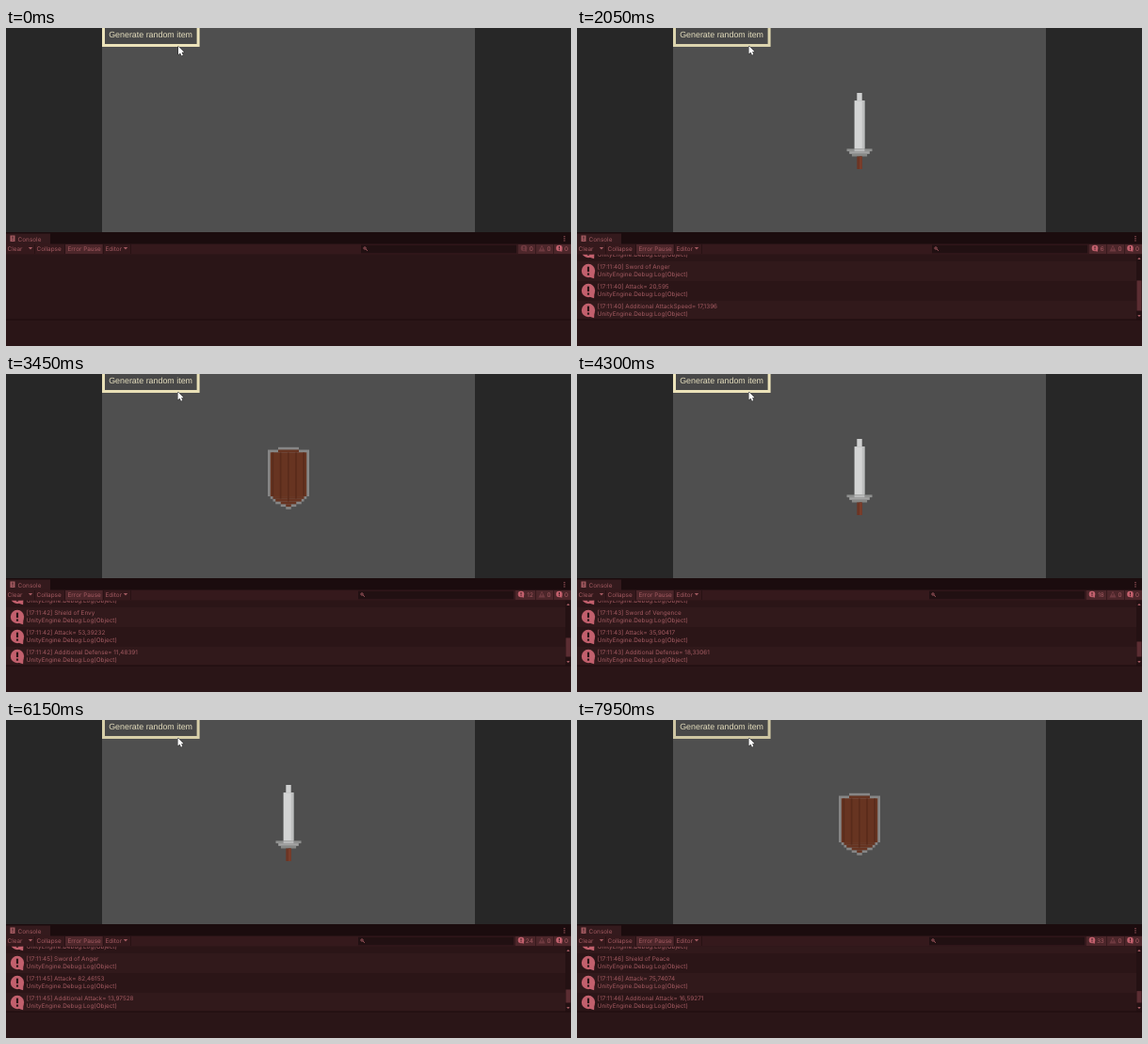
These frames come from a looping animation (600 px wide and 338 px high, 8 s). An HTML page with a canvas:

```html
<!DOCTYPE html>
<html lang="en">
<head>
<meta charset="utf-8">
<title>Random item generator</title>
<style>
  html, body { margin: 0; width: 100%; height: 100%; overflow: hidden; background: #2a1517; }
  canvas { display: block; width: 600px; height: 338px; }
</style>
</head>
<body>
<canvas width="600" height="338"></canvas>
<script>
const g = document.querySelector('canvas').getContext('2d');
g.textRendering = 'geometricPrecision';

const LOOP = 8000, ROW = 21, TOP = 241, BOTTOM = 310;
const UI = '6.4px Inter, sans-serif';
const PINK = '#a35a61', ICON = '#c2606d', DIM = '#6f3a40', PANEL = '#2a1517';

// press time, release time, item name, attack, bonus
const clicks = [
  [50, 250, 'Sword of Vengence', '24,97215', 'Attack= 10,08752'],
  [1150, 1300, 'Sword of Anger', '20,595', 'AttackSpeed= 17,1396'],
  [2000, 2130, 'Sword of Peace', '41,30862', 'Defense= 12,70418'],
  [2720, 2880, 'Shield of Envy', '53,39232', 'Defense= 11,48391'],
  [3440, 3560, 'Sword of Envy', '67,18204', 'Attack= 14,25937'],
  [4070, 4180, 'Sword of Vengence', '35,90417', 'Defense= 18,33061'],
  [4680, 4880, 'Shield of Peace', '53,29805', 'AttackSpeed= 10,61039'],
  [5300, 5500, 'Sword of Anger', '82,46153', 'Attack= 13,97528'],
  [5970, 6120, 'Sword of Peace', '28,71346', 'Defense= 15,06284'],
  [6570, 6720, 'Shield of Envy', '99,45107', 'AttackSpeed= 16,97419'],
  [7170, 7320, 'Shield of Peace', '75,74074', 'Attack= 16,59271'],
  [7800, Infinity]
];

const logs = clicks.filter(c => c[2]).flatMap(([, up, name, attack, bonus]) => {
  const stamp = `[17:11:${39 + Math.floor(up / 1000 + .5)}] `;
  return [name, 'Attack= ' + attack, 'Additional ' + bonus].map(s => stamp + s);
});

const clamp = v => Math.max(0, Math.min(1, v));

function rect(x, y, w, h, color) {
  g.fillStyle = color;
  g.fillRect(x, y, w, h);
}

function text(s, x, y, color = PINK, font = UI, align = 'left') {
  g.font = font;
  g.textAlign = align;
  g.fillStyle = color;
  g.fillText(s, x, y);
}

function poly(color, ...p) {
  g.fillStyle = color;
  g.beginPath();
  for (let i = 0; i < p.length; i += 2) g.lineTo(p[i], p[i + 1]);
  g.closePath();
  g.fill();
}

function bubble(x, y, r, color, mark) {
  g.fillStyle = color;
  g.beginPath();
  g.arc(x, y, r, 0, 7);
  g.fill();
  poly(color, x + r * .1, y + r * .9, x + r * .9, y + r * .3, x + r * .85, y + r * 1.15);
  rect(x - r * .15, y - r * .6, r * .3, r * .75, mark);
  rect(x - r * .15, y + r * .35, r * .3, r * .3, mark);
}

// centred bar on a pixel-art grid of size u
function bar(half, row, rows, y0, u, color) {
  rect(300 - half * u, y0 + row * u, half * 2 * u, rows * u, color);
}

function sword() {
  const b = (half, row, rows, color) => bar(half, row, rows, 69, 2.7, color);
  b(1, 0, 3, '#cfd0d0');
  b(2, 3, 19, '#d3d4d4');
  rect(302.7, 77.1, 2.7, 51.3, '#bfc0c0');
  b(5, 22, 1, '#8f908f');
  b(4, 23, 1, '#a3a4a3');
  b(2, 22, 1, '#b9baba');
  b(3, 24, 1, '#878886');
  b(1, 25, 5, '#6d3524');
  rect(300, 136.5, 2.7, 13.5, '#7b3d2a');
}

function shield() {
  const b = (half, row, rows, color) => bar(half, row, rows, 77.8, 2.75, color);
  const rim = '#868686', wood = '#673421';
  b(4, 0, 1, rim);
  b(8, 1, 18, rim);
  [7, 6, 5, 3, 1].forEach((h, i) => b(h, 19 + i, 1, rim));
  b(4, 1, 1, wood);
  b(7, 2, 17, wood);
  [6, 5, 3, 1].forEach((h, i) => b(h, 19 + i, 1, wood));
  for (let i = -2; i <= 2; i++)
    rect(299 + i * 8.2, 83.5, 1.6, 52 - Math.abs(i) * 3, '#592b1b');
}

function button(t) {
  let shade = 0;
  for (const [down, up] of clicks)
    if (t >= down) shade = clamp((t - down) / 100) * (1 - clamp((t - up) / 100));
  const k = 1 - .13 * shade;
  const tint = `rgb(${236 * k},${227 * k},${186 * k})`;
  rect(102, 0, 103.6, 20, tint);
  rect(105, 0, 97.6, 17, '#484848');
  text('Generate random item', 109.2, 10.3, '#e4ddbd', '8.9px "Liberation Sans", Arial, sans-serif');
}

function cursor(t) {
  g.save();
  g.translate(t < 50 ? 183 : 182.5, t < 50 ? 19.6 : 19);
  const shape = new Path2D('M0 0V8.6L2 6.8L3.4 9.8L4.9 9.1L3.6 6.2H6.2Z');
  g.strokeStyle = '#222';
  g.lineWidth = 1;
  g.stroke(shape);
  g.fillStyle = '#fff';
  g.fill(shape);
  g.restore();
}

function toolbar(n) {
  rect(0, 217, 600, 13, '#1b0c0e');
  rect(0, 218.5, 47, 11.5, '#341a1d');
  rect(4.5, 220.5, 5, 6.5, PINK);
  rect(6.6, 221.5, .9, 2.8, PANEL);
  rect(6.6, 225, .9, .9, PANEL);
  text('Console', 12.6, 226.6);
  for (const y of [221, 223.2, 225.4]) rect(592.4, y, 1.2, 1.2, PINK);

  rect(0, 229.5, 600, 11, '#35191c');
  rect(63, 230, 39.5, 10, '#4c262a');
  for (const x of [30, 62, 103, 132]) rect(x, 230, .7, 10, '#231012');
  text('Clear', 1.5, 236.7);
  text('Collapse', 32.5, 236.7);
  text('Error Pause', 65.5, 236.7);
  text('Editor', 105.5, 236.7);
  for (const x of [26, 127]) poly(PINK, x - 2.2, 233, x + 2.2, 233, x, 235.6);

  const shift = n > 9 ? 3 : 0;
  rect(377 - shift, 230.7, 165, 8.6, '#211012');
  g.strokeStyle = PINK;
  g.lineWidth = .9;
  g.beginPath();
  g.arc(381 - shift, 234, 1.2, 0, 7);
  g.moveTo(382 - shift, 235);
  g.lineTo(384 - shift, 236.8);
  g.stroke();

  rect(544 - shift, 230, 18 + shift, 10, '#4c262a');
  rect(563, 230, 18, 10, '#4c262a');
  rect(582, 230, 18, 10, '#4c262a');
  bubble(550 - shift, 234, 3.3, n ? ICON : DIM, '#3a1c20');
  text(n, 559.8, 236.7, PINK, UI, 'right');
  poly(DIM, 569, 230.8, 572.6, 237.6, 565.4, 237.6);
  rect(568.6, 233, .8, 2.5, '#3a1c20');
  text(0, 578.6, 236.7, PINK, UI, 'right');
  bubble(587.5, 234, 3.3, ICON, '#3a1c20');
  text(0, 597, 236.7, PINK, UI, 'right');
}

function consoleRows(n) {
  rect(0, 240, 600, 98, PANEL);
  g.save();
  g.beginPath();
  g.rect(0, 240.5, 600, BOTTOM - 240.5);
  g.clip();
  const scrolled = n > 3;
  const first = scrolled ? 290 - ROW * (n - 1) : TOP;
  for (let i = Math.max(0, n - 4); i < n; i++) {
    const y = first + i * ROW;
    rect(0, y, scrolled ? 594 : 600, ROW, i ? i % 2 ? '#31191b' : '#2b1517' : '#20283d');
    bubble(12, y + 10, 7.2, ICON, PANEL);
    text(logs[i], 21.8, y + 7.6);
    text('UnityEngine.Debug:Log(Object)', 21.8, y + 15.8);
  }
  if (scrolled) {
    const len = 8 + 44 * 69 / (ROW * n);
    rect(594, 240, 6, 70, '#241113');
    poly(PINK, 595.3, 246, 598.7, 246, 597, 243.8);
    poly(PINK, 595.3, 305, 598.7, 305, 597, 307.2);
    rect(594.5, 300.5 - len, 5, len, '#5b2d32');
  }
  g.restore();
  rect(0, 309.5, 600, 1, '#1d0d0f');
}

function draw(t) {
  rect(0, 0, 600, 217, '#272727');
  rect(102, 0, 396, 217, '#4f4f4f');
  const item = clicks.filter(c => t >= c[1]).pop();
  if (item) item[2].startsWith('Sword') ? sword() : shield();
  button(t);
  cursor(t);
  const n = 3 * clicks.filter(c => t >= c[1] + 50).length;
  consoleRows(n);
  toolbar(n);
}

function frame() {
  draw(performance.now() % LOOP);
  requestAnimationFrame(frame);
}
frame();
</script>
</body>
</html>
```
